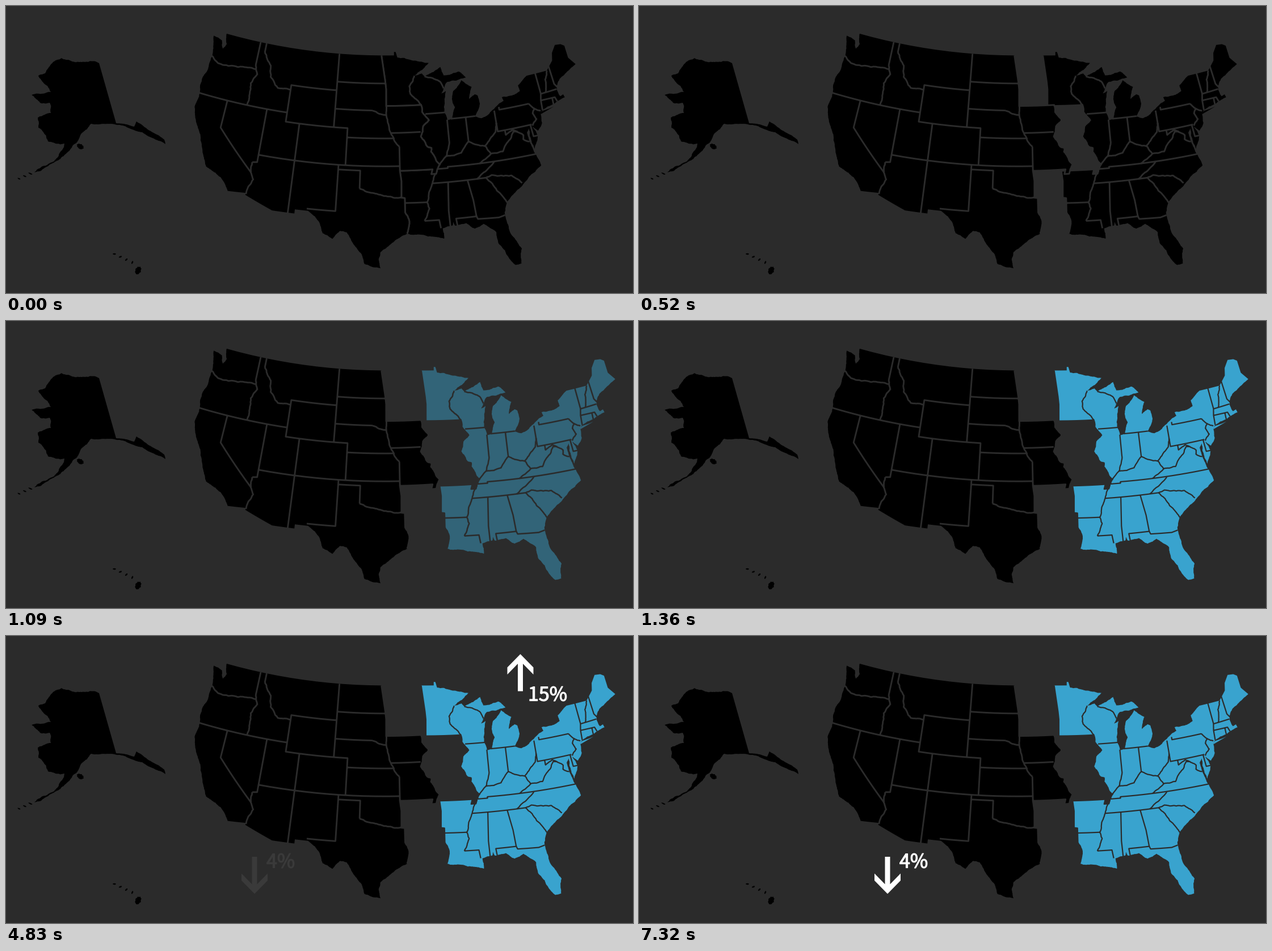
These frames come from a looping animation (1105x507 px, 8000 ms). A matplotlib script:

```python
import numpy as np
import matplotlib.pyplot as plt
from matplotlib import patheffects
from matplotlib.animation import FuncAnimation
from matplotlib.patches import PathPatch, Polygon
from matplotlib.path import Path
from matplotlib.transforms import Affine2D

W, H, DPI = 1105, 507, 64
PT = 72 / DPI
LOOP, STEP = 8000, 20
BG = np.array([43, 43, 43]) / 255
BLUE = np.array([57, 163, 206]) / 255
WHITE = np.ones(3)


def albers(points):
    """Equal-area cone: (degrees west, degrees north) to stage pixels."""
    west, north = np.array(points, float).T
    s1, s2 = np.sin(np.radians([29.5, 45.5]))
    n = (s1 + s2) / 2
    rho = 932 * np.sqrt(1 + s1 * s2 - 2 * n * np.sin(np.radians(north))) / n
    theta = n * np.radians(96.67 - west)
    return np.column_stack([667.4 + rho * np.sin(theta), -939.6 + rho * np.cos(theta)])


def wiggle(points, amount=0.07):
    """Midpoint displacement, for shores and rivers."""
    rng = np.random.default_rng(len(points))
    pts = np.array(points, float)
    for _ in range(4):
        d = np.diff(pts, axis=0)
        side = np.column_stack([-d[:, 1], d[:, 0]]) * rng.uniform(-amount, amount, (len(d), 1))
        mids = (pts[:-1] + pts[1:]) / 2 + side
        pts = np.insert(pts, np.arange(1, len(pts)), mids, axis=0)
    return pts


def survey(points):
    """Surveyed border: parallels bend with the cone, meridians stay straight."""
    t = np.linspace(0, len(points) - 1, 12 * (len(points) - 1) + 1)
    west, north = np.array(points, float).T
    k = np.arange(len(points))
    return albers(np.column_stack([np.interp(t, k, west), np.interp(t, k, north)]))


def river(points):
    return wiggle(albers(points))


def area(*pieces):
    pts = np.vstack(pieces)
    codes = [Path.MOVETO] + [Path.LINETO] * (len(pts) - 1) + [Path.CLOSEPOLY]
    return Path(np.vstack([pts, pts[:1]]), codes)


def blob(x, y, rx, ry, tilt=0.0):
    a = np.linspace(0, 2 * np.pi, 9)
    ring = np.column_stack([rx * np.cos(a), ry * np.sin(a)])
    turn = np.array([[np.cos(tilt), np.sin(tilt)], [-np.sin(tilt), np.cos(tilt)]])
    return area(wiggle(ring @ turn + (x, y), 0.15))


# Line along which the country parts, north to south
split = np.vstack([
    survey([(97.2, 49), (96.6, 46.3), (96.45, 45.3), (96.45, 43.5), (91.2, 43.5)]),
    river([(91.2, 43.5), (91.1, 42.7), (90.2, 41.8), (91.1, 41.2), (91.5, 40.1), (90.7, 39),
           (90.1, 38.8), (90.2, 38.4), (89.5, 37.3), (89.1, 37), (89.5, 36.5)]),
    survey([(89.5, 36.5), (89.7, 36), (90.35, 36), (90.15, 36.5), (94.6, 36.5), (94.43, 35.4),
            (94.48, 33.6), (94.04, 33.55), (94.04, 32)]),
    river([(94.04, 32), (93.55, 31.1), (93.85, 29.7)])])

# Western rim, from the Gulf round to the northern border
west_rim = np.vstack([
    river([(93.85, 29.7), (94.7, 29.35), (95.9, 28.6), (97.2, 27.7), (97.4, 26.9), (97.15, 25.95),
           (99.1, 26.4), (99.5, 27.5), (100.3, 28.3), (101.4, 29.77), (102.3, 29.88),
           (103.15, 28.98), (104.4, 29.5), (104.9, 30.6), (106.5, 31.78)]),
    survey([(106.5, 31.78), (108.2, 31.78), (108.2, 31.33), (111.07, 31.33), (114.8, 32.5),
            (114.72, 32.72), (117.12, 32.53)]),
    river([(117.12, 32.53), (118.4, 33.8), (119.2, 34.15), (120.6, 34.55), (121.9, 36.6),
           (122.5, 37.75), (123.8, 39.3), (124.35, 40.4), (124.2, 42), (124.5, 42.85),
           (124.05, 44.7), (124, 46.25), (124.7, 48.4), (123.2, 48.15), (122.7, 47.3),
           (122.3, 47.9), (122.76, 49)]),
    survey([(122.76, 49), (97.2, 49)])])

# Eastern rim, from the Gulf up the Atlantic and back along the lakes
east_rim = np.vstack([
    river([(93.85, 29.7), (92.3, 29.55), (91.3, 29.3), (90.1, 29.15), (89.3, 28.95), (89.4, 30.05),
           (88.1, 30.3), (88, 30.65), (87.8, 30.25), (86.4, 30.4), (85.4, 29.7), (84.2, 30.1),
           (82.8, 29), (82.75, 27.8), (81.7, 25.9), (81.1, 25.15), (80.4, 25.2), (80.05, 26.8),
           (81.3, 29.8), (81.4, 31), (80.9, 32), (79.2, 33.2), (78, 33.9), (76.5, 34.7),
           (75.55, 35.25), (75.95, 36.55), (76.4, 38), (76.5, 39), (76.1, 39.4), (76.2, 38.6),
           (75.95, 37.15), (75.1, 38.4), (75.55, 39.5), (74.9, 38.95), (74.1, 39.7), (74, 40.6),
           (73.7, 40.95), (71.85, 41.3), (70.65, 41.6), (70, 41.7), (70.1, 42.05), (70.6, 41.95),
           (70.8, 42.6), (70.7, 43.1), (69.9, 43.8), (67, 44.8)]),
    survey([(67, 44.8), (67.8, 45.7), (67.8, 47.07), (68.3, 47.35), (69.2, 47.45), (70, 46.7),
            (70.3, 45.9), (71.5, 45), (74.7, 45)]),
    river([(74.7, 45), (76.3, 44.2), (76.2, 43.55), (77.5, 43.25), (79.05, 43.27), (78.9, 42.85),
           (81.3, 41.75), (82.5, 41.4), (83.45, 41.7), (82.45, 43), (82.6, 43.9), (83, 44.07),
           (83.9, 43.65), (83.3, 44.9), (84.75, 45.78), (85.6, 45), (86.2, 44.7), (86.5, 43.9),
           (86.2, 42.9), (86.8, 41.75), (87.5, 41.65), (87.8, 42.5), (87.3, 44.8), (88, 44.55),
           (87, 45.75), (84, 46), (85, 46.75), (86.5, 46.5), (87.4, 46.5), (87.8, 47.45),
           (88.9, 47), (90.4, 46.57), (90.8, 46.9), (92, 46.7), (89.6, 48), (90.8, 48.2),
           (92.5, 48.45), (94.6, 48.75), (94.9, 49.38)]),
    survey([(95.15, 49.38), (95.15, 49), (97.2, 49)])])
long_isle = albers([(74, 40.6), (71.9, 41.05), (72.6, 40.97), (73.7, 40.9)])

west_borders = [survey(b) for b in (
    [(124.3, 42), (111.05, 42)],
    [(120, 42), (120, 39), (114.63, 35)],
    [(114.05, 42), (114.05, 36.2), (114.7, 36.1)],
    [(114.05, 37), (94.6, 37)],
    [(104.05, 45), (111.05, 45), (111.05, 41), (102.05, 41), (102.05, 37)],
    [(104.05, 49), (104.05, 41)],
    [(104.05, 45.94), (96.6, 45.94)],
    [(104.05, 43), (98.5, 43)],
    [(109.05, 41), (109.05, 31.2)],
    [(102.05, 40), (95.3, 40)],
    [(95.77, 40.58), (91.5, 40.6)],
    [(94.6, 39.1), (94.6, 36.5)],
    [(103, 37), (103, 32), (106.7, 32)],
    [(103, 36.5), (100, 36.5), (100, 34.56)],
    [(117.04, 49), (117.04, 46.4)],
    [(116.05, 49), (116.05, 48)])]
west_borders += [river(b) for b in (
    [(124.1, 46.25), (122.8, 45.65), (121.2, 45.65), (119, 45.95), (116.95, 46)],
    [(117.04, 46.4), (116.5, 45.5), (117.2, 44.4), (117.03, 43.8), (117.03, 42)],
    [(116.05, 48), (114.7, 46.7), (114.4, 45.5), (113, 44.45), (111.05, 44.5)],
    [(114.7, 36.1), (114.63, 35), (114.15, 34.3), (114.72, 32.6)],
    [(98.5, 43), (96.45, 42.5), (95.8, 40.6), (94.6, 39.1)],
    [(96.45, 43.5), (96.45, 42.5)],
    [(100, 34.56), (98.1, 34.1), (96.5, 33.8), (94.48, 33.64)])]

east_borders = [survey(b) for b in (
    [(79.76, 42.3), (79.76, 42), (75.35, 42)],
    [(80.52, 42), (80.52, 39.72), (75.6, 39.75)],
    [(73.35, 45.1), (73.27, 42.75), (73.5, 42.05), (73.6, 41)],
    [(73.27, 42.73), (70.8, 42.8)],
    [(73.5, 42.04), (71.4, 42), (71.2, 41.5)],
    [(71.8, 42.02), (71.85, 41.2)],
    [(71.08, 45.4), (70.97, 43.4), (70.65, 43)],
    [(84.8, 41.73), (84.82, 39.1)],
    [(87, 41.76), (83.4, 41.73)],
    [(87.53, 41.7), (87.53, 39.35)],
    [(89.5, 36.5), (88.07, 36.5), (88.07, 36.65), (75.8, 36.55)],
    [(90.3, 35), (83.1, 35)],
    [(88.2, 35), (88.45, 31.9), (88.4, 30.2)],
    [(87.5, 30.2), (87.6, 31), (85, 31), (84.86, 30.7), (82.2, 30.55), (81.4, 30.7)],
    [(91.6, 31), (89.75, 31), (89.6, 30.1)],
    [(94.04, 33.02), (91.15, 33)],
    [(90.65, 42.5), (87.7, 42.5)],
    [(75.79, 39.72), (75.7, 38.46), (75, 38.45)],
    [(85.6, 35), (85.15, 32.8), (85, 31)])]
east_borders += [river(b) for b in (
    [(92, 46.7), (92.3, 46.1), (92.85, 45.6), (92.75, 44.75), (91.2, 43.5)],
    [(90.4, 46.57), (88.1, 45.9), (87.6, 45.1)],
    [(89.1, 37), (88.1, 37.8), (86, 38), (84.82, 39.1), (83.7, 38.65), (82.6, 38.4),
     (80.85, 39.7), (80.52, 40.64)],
    [(87.53, 39.35), (88.1, 37.8)],
    [(82.6, 38.4), (81.95, 37.5), (80.3, 37.5), (78.35, 39.4), (77.75, 39.3)],
    [(79.48, 39.72), (79.48, 39.2), (78.4, 39.6), (77.05, 38.8), (77.2, 38.4), (76.4, 38)],
    [(81.95, 37.5), (83.7, 36.6)],
    [(81.7, 36.6), (84.3, 35)],
    [(83.1, 35), (82.3, 35.2), (80.8, 34.9), (79.7, 34.8), (78.5, 33.8)],
    [(83.1, 35), (81.9, 33.4), (80.85, 32)],
    [(89.5, 36.5), (90.3, 35), (91.15, 33), (90.9, 32.3), (91.6, 31)],
    [(73.9, 40.95), (74.7, 41.35), (75.35, 42)],
    [(74.7, 41.35), (75.1, 40.9), (74.75, 40.2), (75.5, 39.6)],
    [(71.5, 45), (72.1, 44.1), (72.5, 42.73)])]

# Alaska and Hawaii lie outside the cone, so these are stage pixels
alaska = area(
    wiggle([(150, 208), (133, 225), (118, 246), (98, 267), (70, 285), (50, 294), (72, 281),
            (93, 264), (103, 243), (74, 239), (70, 228), (57, 215), (56, 197), (79, 189),
            (77, 171), (60, 171), (45, 157), (79, 152), (71, 140), (57, 123), (69, 119),
            (80, 102), (98, 92), (130, 99), (158, 98)], 0.1),
    [(164, 101)],
    wiggle([(194, 207), (226, 213), (230, 204), (258, 223), (279, 236), (281, 244), (262, 235),
            (240, 223), (222, 218), (200, 210), (150, 208)], 0.05))
isles = [blob(43 - 10 * k, 296 + 4.5 * k, 4 - 0.6 * k, 1.2, 0.4) for k in range(3)]
isles += [blob(191 + 10.5 * k, 438 + 5 * k, 3, 1.4, -0.4 * k) for k in range(4)]
isles += [blob(131, 248, 7, 4.5, 0.5), blob(233, 467, 5.5, 7.5, 0.5)]


def ramp(t, start, steps):
    """Count of 30 ms steps taken since start, from 0 to steps."""
    return int(np.clip((t - start) // 30 + 1, 0, steps))


def ease(p):
    return 2 * p * p if p < 0.5 else 1 - 2 * (1 - p) ** 2


fig = plt.figure(figsize=(W / DPI, H / DPI), dpi=DPI, facecolor=BG)
ax = fig.add_axes([0, 0, 1, 1])
ax.set_xlim(0, W)
ax.set_ylim(H, 0)
ax.axis("off")
shift = Affine2D()


def add_block(fill, borders, moved=None):
    tr = moved + ax.transData if moved is not None else ax.transData
    net = Path.make_compound_path(*map(Path, borders + [split]))
    land = ax.add_patch(PathPatch(fill, fc="black", ec="none", transform=tr))
    edge = ax.add_patch(PathPatch(net, fill=False, ec=BG, lw=2.9 * PT,
                                  joinstyle="round", capstyle="butt", transform=tr))
    return land, edge


def add_arrow(x, tip, way):
    half = [(0, 0), (23, 23.5), (23, 36), (4.5, 17), (4.5, 65.5)]
    pts = half + [(-dx, dy) for dx, dy in half[:0:-1]]
    return ax.add_patch(Polygon([(x + dx, tip + way * dy) for dx, dy in pts], ec="none"))


def add_label(x, y, text):
    return ax.text(x, y, text, family="Noto Sans CJK JP", weight="medium",
                   size=34 * PT, ha="left", va="baseline")


east = Path.make_compound_path(area(split, east_rim), area(long_isle))
east_land, east_edge = add_block(east, east_borders, shift)
add_block(area(split, west_rim), west_borders)
ax.add_patch(PathPatch(Path.make_compound_path(alaska, *isles), fc="black", ec="none"))

rise = add_arrow(906.5, 32, 1), add_label(920, 114.5, "15%")
fall = add_arrow(438, 455.5, -1), add_label(459, 409.5, "4%")


def show(pair, level):
    arrow, label = pair
    color = BG + (WHITE - BG) * level
    arrow.set_facecolor(color)
    label.set_color(color)
    label.set_path_effects([patheffects.withStroke(linewidth=1.2 * PT, foreground=color)])
    for item in pair:
        item.set_visible(level > 0)


def draw(i):
    t = i * STEP + STEP / 2
    shift.clear().translate(10 * ramp(t, 400, 7), 0)

    # black gives way to the ground while blue builds up
    n = ramp(t, 850, 18)
    blue = ease(max(0, n - 0.5) / 17.5)
    ground = BG * min(1, n / 4.7)
    east_land.set_facecolor(ground + (BLUE - ground) * blue)
    east_edge.set_linewidth((2.9 - 0.7 * blue) * PT)

    show(rise, ramp(t, 2420, 5) / 5 if t < 7320 else 0)
    show(fall, ramp(t, 4830, 14) / 14)
    return east_land, east_edge, *rise, *fall


anim = FuncAnimation(fig, draw, frames=LOOP // STEP, interval=STEP, repeat=True, repeat_delay=0)
plt.show()
```
